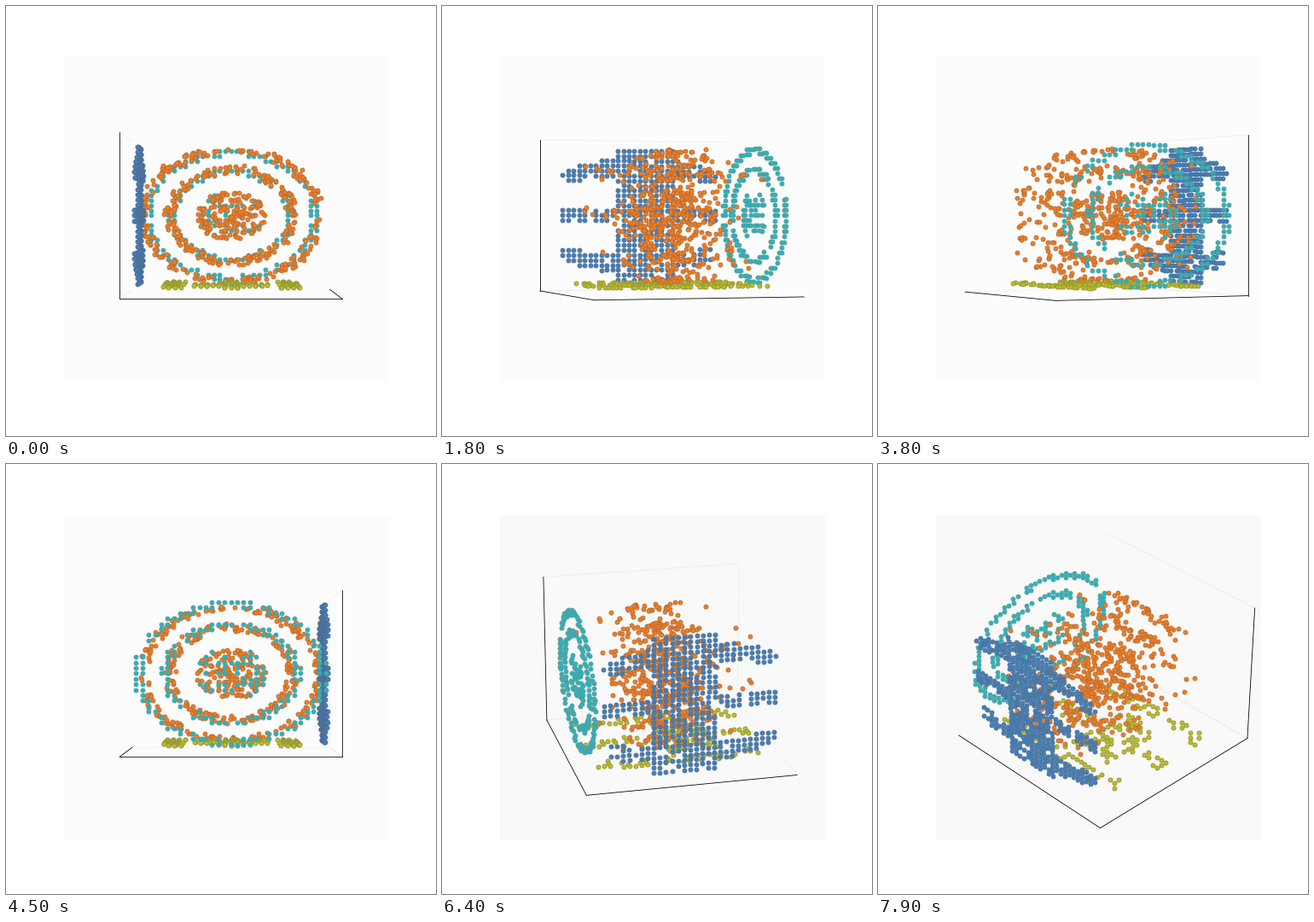
These frames come from a looping animation (504x504 px, 8 s). A matplotlib script:

```python
import numpy as np
import matplotlib.pyplot as plt
from matplotlib.animation import FuncAnimation

SIZE, DPI = 504, 72
FRAMES, INTERVAL = 80, 100
WALL = 0.88
SPAN = 0.86
NX, NZ = 15, 13      # lattice half counts, horizontal and vertical

rng = np.random.default_rng(7)


def rings(y, z):
    """Two rings around a disc: the shape seen from the front."""
    r = np.hypot(y, z)
    outer = (r > 0.93) & (r < 1.03)
    middle = (r > 0.63) & (r < 0.74)
    return outer | middle | (r < 0.38)


def lobes(x, s):
    """Three arms on each side, at the heights -0.7, 0 and 0.7."""
    x, s = np.abs(x), np.abs(s)
    centre = s < 0.18 - 0.08 * x
    side = np.abs(s - 0.74 + 0.16 * x**2) < 0.22 - 0.14 * x
    return (centre | side) & (x < 0.98)


def profile(x, s):
    """The arms joined by an upright core: the shape seen from the side."""
    core = np.abs(x + 0.08) < 0.36
    return (core & (np.abs(s) < 1.01)) | lobes(x, s)


def lattice(na, nb):
    a, b = np.meshgrid(np.arange(-na, na + 1) / na, np.arange(-nb, nb + 1) / nb)
    return a.ravel(), b.ravel()


def keep(a, b, chance):
    on = rng.random(a.size) < chance
    return SPAN * a[on], SPAN * b[on]


def make_cloud(n):
    """Random points that fit the front, side and top shapes."""
    x = rng.normal(0, 0.42, 14 * n)
    y, z = rng.uniform(-1, 1, (2, 14 * n))
    ok = rings(y, z) & profile(x, z) & profile(x, y)
    return SPAN * np.column_stack([x, y, z])[ok][:n]


def on_wall(axis, a, b):
    return np.insert(np.column_stack([a, b]), axis, -WALL, axis=1)


y, z = lattice(NX, NZ)
front = on_wall(0, *keep(y, z, 0.85 * rings(y, z) - 0.25 * (np.hypot(y, z) < 0.4)))

x, z = lattice(NX, NZ)
side = on_wall(1, *keep(x, z, 0.88 * profile(x, z)))

x, y = lattice(NX, NX)
blob = (np.abs(x - 0.2) < 0.28) & (np.abs(y) < 0.45)
arms = lobes(x, y) & (np.abs(y) < 0.78)
floor = on_wall(2, *keep(x, y, np.maximum(0.6 * blob, 0.45 * arms)))

fig = plt.figure(figsize=(SIZE / DPI, SIZE / DPI), dpi=DPI, facecolor="white")
ax = fig.add_axes([68 / SIZE, 63 / SIZE, 381 / SIZE, 381 / SIZE],
                  projection="3d")
ax.set(xlim=(-1, 1), ylim=(-1, 1), zlim=(-1, 1))
ax.grid(False)
for axis in (ax.xaxis, ax.yaxis, ax.zaxis):
    axis.set_ticks([])
    axis.pane.set_fill(False)
ax.xaxis.pane.set_edgecolor("none")

for pts, color, edge in [
    (side, "#4080bb", "#4f7096"),
    (make_cloud(560), "#f67c1b", "#b5703c"),
    (floor, "#bcbd22", "#95973a"),
    (front, "#17bac9", "#6b9890"),
]:
    ax.scatter(*pts.T, s=25, c=color, edgecolors=edge, linewidths=0.9,
               depthshade=False)


def update(i):
    elev = max(0, i - 45)
    ax.view_init(elev=elev, azim=4 * i)
    ax.set_facecolor(str(0.99 - 0.014 * min(1, elev / 20)))
    return []


anim = FuncAnimation(fig, update, frames=FRAMES, interval=INTERVAL,
                     init_func=lambda: [], repeat=True, repeat_delay=0)
plt.show()
```
